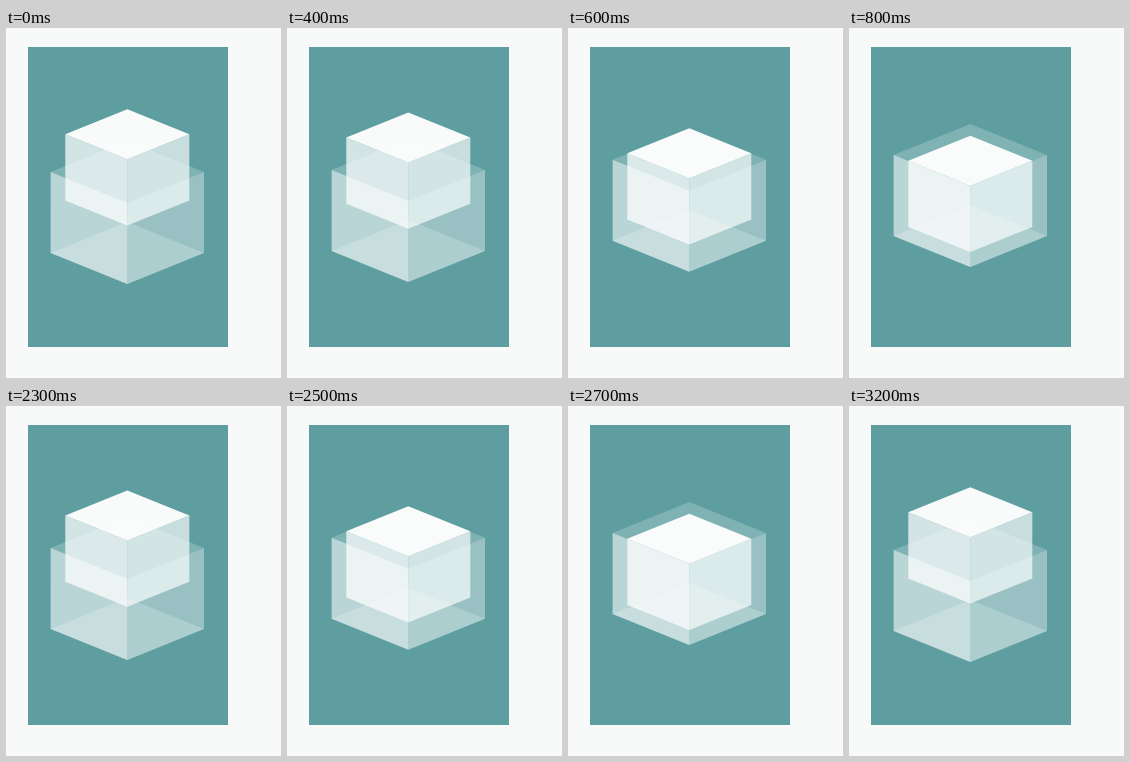
Write an HTML page with a canvas that moves like this. It is 275x350 px and loops after 4700 ms.

```html
<!DOCTYPE html>
<html>
<head>
<meta charset="utf-8">
<style>
html, body { margin: 0; width: 100%; height: 100%; overflow: hidden; background: #f8faf9; }
canvas { display: block; }
</style>
</head>
<body>
<canvas id="stage" width="275" height="350"></canvas>
<script>
const ctx = document.getElementById('stage').getContext('2d');
const LOOP = 4700, CX = 121.3;
const STEPS = [0.12, 0.4, 0.72, 0.94, 1];

function face(alpha, ...points) {
  ctx.fillStyle = `rgba(255,255,255,${alpha})`;
  ctx.beginPath();
  points.forEach(([x, y]) => ctx.lineTo(CX + x, y));
  ctx.fill();
}

// Horizontal face with its left and right corners at height y
function lid(alpha, y, w, d) {
  face(alpha, [-w, y], [0, y - d], [w, y], [0, y + d]);
}

// Front wall; a negative w gives the left one
function wall(alpha, y, w, d, h) {
  face(alpha, [w, y], [0, y + d], [0, y + d + h], [w, y + h]);
}

// Two squeezes per loop, each ending in a sudden release
function squeeze(t) {
  for (const [start, end] of [[400, 1400], [2300, 3200]])
    if (t >= start && t < end) return STEPS[Math.min(4, Math.floor((t - start) / 100))];
  return 0;
}

function draw(now) {
  const k = squeeze(now % LOOP);
  const outer = 144 - 17 * k, inner = 106.3 + 26.4 * k;
  ctx.fillStyle = '#f8faf9';
  ctx.fillRect(0, 0, 275, 350);
  ctx.fillStyle = '#5f9ea0';
  ctx.fillRect(22, 19, 200, 300);

  lid(0.2, outer + 81, 76.7, 31);
  lid(0.2, outer, 76.7, 31);
  wall(0.72, inner, -62, 25, 66.3);
  wall(0.65, inner, 62, 25, 66.3);
  lid(0.96, inner, 62, 25);
  wall(0.57, outer, -76.7, 31, 81);
  wall(0.36, outer, 76.7, 31, 81);
}

function loop() {
  draw(performance.now());
  requestAnimationFrame(loop);
}
loop();
</script>
</body>
</html>
```
